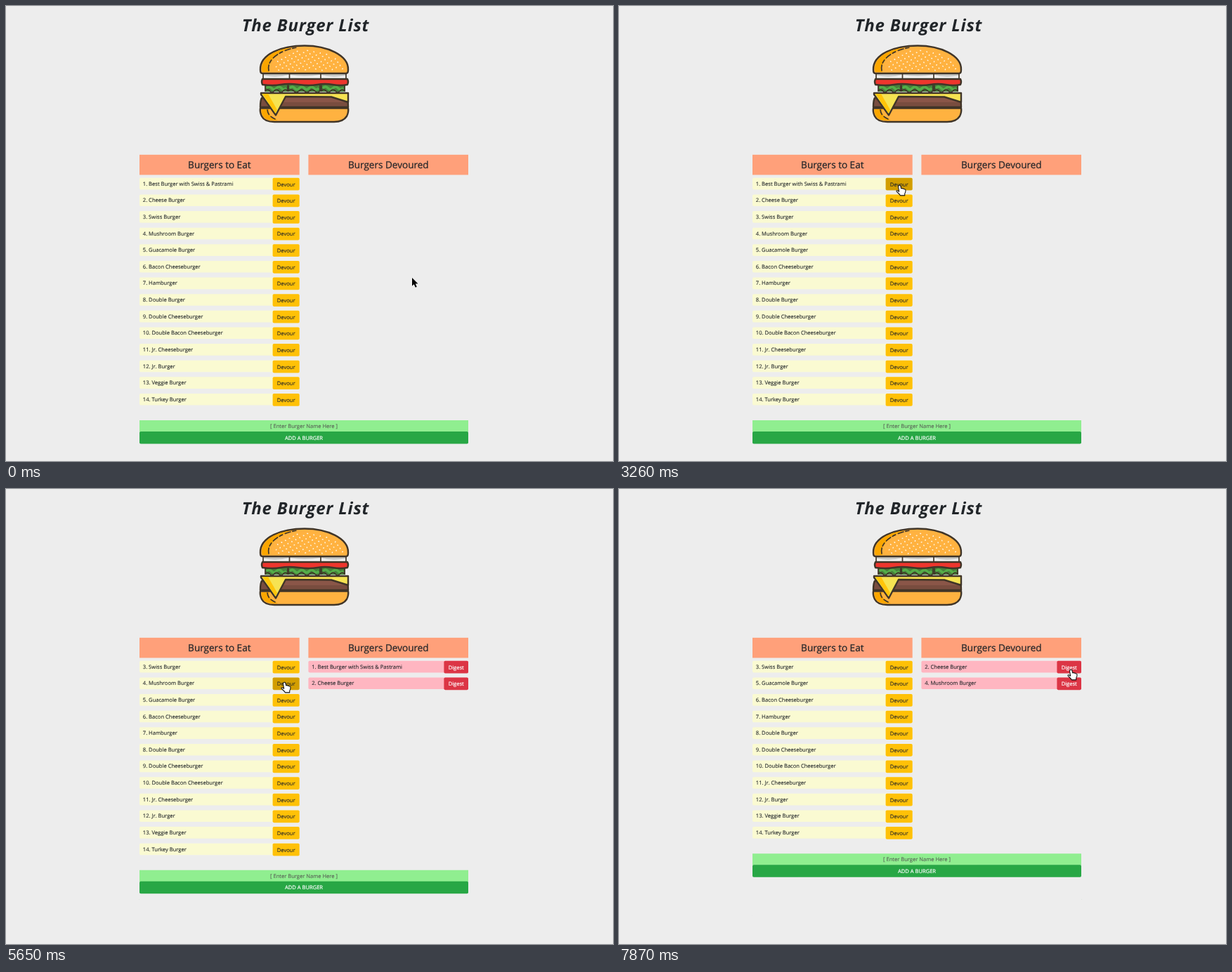
Recreate the animation shown at these times as an HTML page. Size 864 px wide and 648 px high, loop 8 s.

```html
<!DOCTYPE html>
<html lang="en">
<head>
<meta charset="utf-8">
<title>The Burger List</title>
<style>
  html, body { margin: 0; width: 100%; height: 100%; overflow: hidden; background: #ededed; }
  svg { display: block; width: 864px; height: 648px; }
  text { font: 7.58px "Open Sans", "Noto Sans", sans-serif; fill: #212529; stroke: #212529; stroke-width: .1px; text-rendering: geometricPrecision; }
  .title { font-size: 24px; font-style: italic; font-weight: 700; letter-spacing: .8px; stroke: none; }
  .head { font-size: 13.55px; stroke-width: .25px; }
  .mid { text-anchor: middle; }
  .hint { fill: #586156; stroke: #586156; }
  .white { fill: #fff; stroke: #fff; stroke-width: .2px; }
  .line { stroke: #403528; stroke-width: 2.4; stroke-linejoin: round; stroke-linecap: round; }
  .thin { fill: none; stroke-width: 1.7; }
</style>
</head>
<body>
<svg viewBox="0 0 864 648">
  <rect width="864" height="648" fill="#ededed"/>
  <text class="title mid" x="426.500" y="36">The Burger List</text>

  <g id="burger">
    <path fill="#f3f3f1" d="M367 96H484V105H367Z"/>
    <path fill="#c9cac8" d="M367 96H484V99Q464 103 448 98Q425 102 403 98Q385 103 367 99Z"/>
    <path class="line thin" d="M366 96V104M403.500 96V104M448 96V104M484 96V104"/>
    <path fill="#467f3b" d="M369 112H483V122H369Z"/>
    <g id="lettuce"></g>
    <path class="line" fill="#ee352d" d="M365 104H486Q488 108 486 112Q476 114 465 112T443 112T417 112T391 112T365 112Q363 108 365 104Z"/>
    <path class="line" fill="#794d3f" d="M364 131H485Q487 134 487 144H362Q362 134 364 131Z"/>
    <path fill="#8a5648" d="M398 130H463L484 137H393Z"/>
    <path class="line" fill="#ffb240" d="M362 145.500H487Q488 151 485 157Q480 165 467 165H382Q368 165 364 157Q361 151 362 145.500Z"/>
    <path fill="#fba600" d="M363.500 147H375Q370 154 387 163H381Q363 163 363.500 147Z"/>
    <path class="line" fill="#f6e352" d="M363 124H487V137L463 129.500L398 129L384 155.500L363 126Z"/>
    <path fill="#ffc40a" d="M365 125H373L386 148L383.500 153Z"/>
    <path class="line thin" stroke-dasharray="7 4" d="M372 148Q373 158 386 162"/>
    <path class="line" fill="#ffb240" d="M365 96Q362 96 362 91C361 68 393 56.500 425 56.500S488 70 487 91Q487 96 484 96Z"/>
    <path fill="#fba600" d="M365 94Q361 82 374 71Q387 61 408 59Q385 66 377 80Q372 87 375 94Z"/>
    <path class="line thin" stroke-dasharray="8 3 5 4" d="M374 92C371 78 386 64 414 59"/>
    <g id="seeds" fill="#fff7e5"></g>
  </g>

  <g fill="#ffa07a"><rect x="190" y="211.800" width="227.700" height="28.700"/><rect x="430.400" y="211.800" width="227.600" height="28.700"/></g>
  <text class="head mid" x="303.800" y="231">Burgers to Eat</text>
  <text class="head mid" x="544.300" y="231">Burgers Devoured</text>
  <g id="lists"></g>
  <g id="form">
    <path fill="#90ee90" d="M190 0H658V16.500H190Z"/>
    <rect x="190" y="16" width="468" height="17.600" rx="1.800" fill="#28a745"/>
    <text class="mid hint" x="424" y="10.800">[ Enter Burger Name Here ]</text>
    <text class="mid white" x="424" y="27.700">ADD A BURGER</text>
  </g>
  <g id="cursor">
    <path id="arrow" stroke="#fff" paint-order="stroke" d="M0 0V11.700L2.700 9.200L4.700 13.800L6.800 12.900L4.800 8.400H8.500Z"/>
    <path id="hand" transform="translate(-5 -1) scale(1.060)" fill="#fff" stroke="#111" stroke-linejoin="round" d="M4 1.200C5 .3 6.200 .8 6.500 2L7.300 5.200C8 4.500 9 4.700 9.400 5.500C10.200 5 11 5.300 11.400 6.200C12.400 5.800 13.200 6.400 13.200 7.500C13.300 9.500 12.600 11 12 12V14.500H6C5 12.500 3 11 1.200 9.300C.4 8.300 1.300 7.300 2.600 8L4.400 9.200L3.300 2.600C3.200 2 3.500 1.500 4 1.200Z"/>
  </g>
</svg>
<script>
const LOOP = 8000, BEAT = 148.3, TOP = 244.8, PITCH = 23.63, BUTTON_H = 17.7;
const $ = id => document.getElementById(id);

const kinds = ['Best Burger with Swiss & Pastrami', 'Cheese Burger', 'Swiss Burger',
  'Mushroom Burger', 'Guacamole Burger', 'Bacon Cheeseburger', 'Hamburger', 'Double Burger',
  'Double Cheeseburger', 'Double Bacon Cheeseburger', 'Jr. Cheeseburger', 'Jr. Burger',
  'Veggie Burger', 'Turkey Burger'];
const burgers = kinds.map((kind, i) => `${i + 1}. ${kind.replace('&', '&amp;')}`);

const columns = [
  { x: 190, bx: 379.6, w: 38.1, label: 'Devour', cls: 'mid',
    fill: '#fafad2', idle: '#ffc107', hover: '#e0a800', press: '#d39e00' },
  { x: 430.4, bx: 623.4, w: 34.6, label: 'Digest', cls: 'mid white',
    fill: '#ffb6c1', idle: '#dc3545', hover: '#c82333', press: '#bd2130' }
];

// Pointer stops: beat, x, y
const stops = [
  [0, 578, 387], [5, 577.5, 387], [11, 418, 264], [12, 402, 257], [16, 399, 255.5],
  [23, 399, 255.5], [25, 404, 266.5], [28, 404, 266.5], [29, 404, 267.5], [31, 401, 257],
  [34, 401, 257], [37, 396, 275.5], [40, 396, 275.5], [43, 580.5, 295.5],
  [45, 648, 281], [47, 643, 257.5]
];
const clicks = [23, 34, 39, 52];

const smooth = p => p * p * (3 - 2 * p);

function pointer(beat) {
  const next = stops.findIndex(s => s[0] > beat);
  if (next < 0) return stops.at(-1).slice(1);
  const [t0, x0, y0] = stops[Math.max(next - 1, 0)], [t1, x1, y1] = stops[next];
  const p = smooth(Math.max(0, (beat - t0) / (t1 - t0)));
  return [x0 + (x1 - x0) * p, y0 + (y1 - y0) * p];
}

// Column and row of the button below a point
function hit([x, y], lists) {
  const col = columns.findIndex(c => x > c.bx && x < c.bx + c.w);
  const depth = y + 4 - TOP, row = Math.floor(depth / PITCH);
  const inside = col >= 0 && row >= 0 && row < lists[col].length && depth % PITCH < BUTTON_H;
  return inside ? { col, row } : null;
}

// Replays the clicks made so far
function listsAt(beat) {
  const lists = [[...burgers], []];
  for (const click of clicks.filter(c => c <= beat)) {
    const target = hit(pointer(click - 1), lists);
    const [item] = lists[target.col].splice(target.row, 1);
    if (target.col === 0) lists[1].push(item);
  }
  return lists;
}

function drawRow(c, text, i, state) {
  const y = TOP + i * PITCH;
  return `<rect x="${c.x}" y="${y}" width="227.6" height="16.6" rx="1.8" fill="${c.fill}"/>
    <text x="${c.x + 4.8}" y="${y + 10.9}">${text}</text>
    <rect x="${c.bx}" y="${y}" width="${c.w}" height="${BUTTON_H}" rx="1.8" fill="${c[state]}"/>
    <text class="${c.cls}" x="${c.bx + c.w / 2}" y="${y + 11.8}">${c.label}</text>`;
}

function render(beat) {
  const lists = listsAt(beat), [x, y] = pointer(beat);
  // Hover trails the pointer by a beat and pauses after each click
  const fresh = clicks.some(c => beat >= c && beat < c + 2);
  const hot = fresh ? null : hit(pointer(beat - 1), lists);
  const active = clicks.includes(beat + 1) ? 'press' : 'hover';
  $('lists').innerHTML = columns.map((c, col) => lists[col].map((text, row) =>
    drawRow(c, text, row, hot && hot.col === col && hot.row === row ? active : 'idle')
  ).join('')).join('');
  $('form').setAttribute('transform', `translate(0 ${259.2 + lists[0].length * PITCH})`);

  const over = hit([x, y], lists);
  $('cursor').setAttribute('transform', `translate(${x} ${y})`);
  $('hand').style.display = over ? '' : 'none';
  $('arrow').style.display = over ? 'none' : '';
}

function drawSeeds() {
  let dots = '';
  for (let i = 0; i < 84; i++) {
    const x = 382 + (i * 0.618034 % 1) * 100, y = 62 + i * 0.36;
    if (((x - 430) / 52) ** 2 + ((y - 95) / 33) ** 2 < 1)
      dots += `<ellipse cx="${x}" cy="${y}" rx="1.1" ry=".8" transform="rotate(${i * 47} ${x} ${y})"/>`;
  }
  $('seeds').innerHTML = dots;
}

function drawLettuce() {
  const wave = (a, b, y) => {
    const n = Math.round((b - a) / 7), step = (b - a) / n;
    return `M${a} ${y}q${step / 2} -4 ${step} 0` + `t${step} 0`.repeat(n - 1);
  };
  $('lettuce').innerHTML = [[369, 401], [402, 447], [449, 482]].map(([a, b]) =>
    `<path fill="none" stroke="#55ad49" stroke-width="3.5" d="${wave(a + 2, b - 2, 117)}"/>
     <path class="line thin" d="M${a} 113V121M${b} 113V121${wave(a, b, 121)}"/>`).join('');
}

const start = performance.now();
let shown;
function tick() {
  const t = (performance.now() - start) % LOOP;
  const beat = Math.floor((t + 12) / BEAT);
  if (beat !== shown) render(shown = beat);
  requestAnimationFrame(tick);
}
drawSeeds();
drawLettuce();
tick();
</script>
</body>
</html>
```
